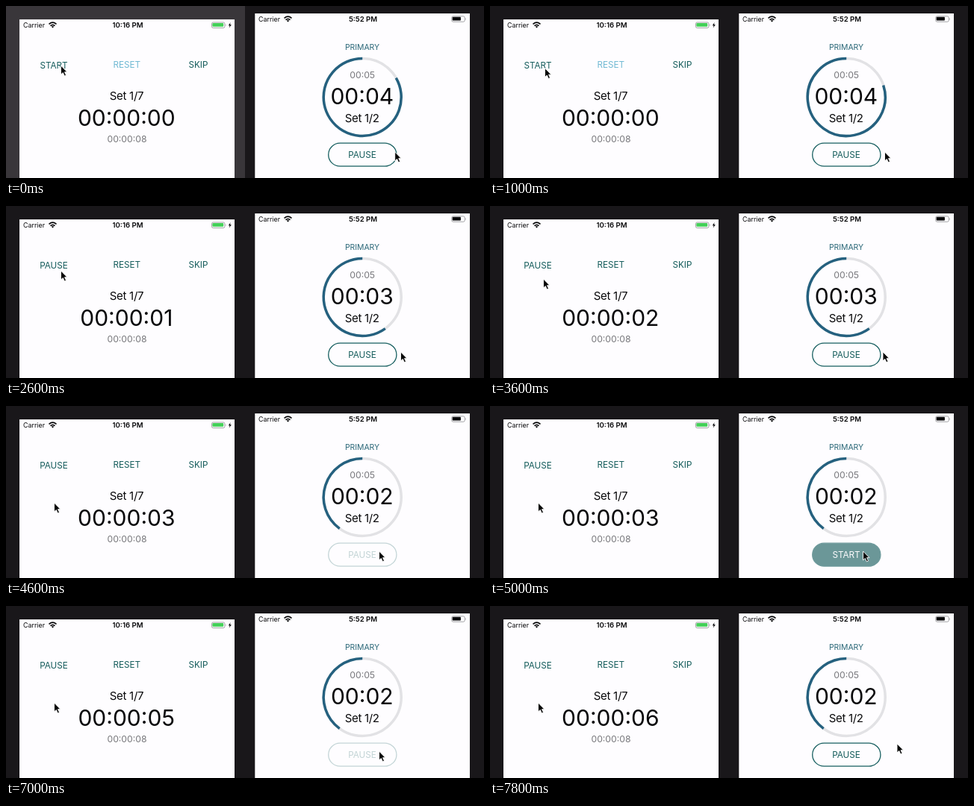
Animation, 640 px wide and 231 px high, one loop 8000 ms. Source, as an HTML page:

```html
<!DOCTYPE html>
<html lang="en">
<head>
<meta charset="utf-8">
<title>Interval timers</title>
<style>
  html, body { margin: 0; width: 100%; height: 100%; overflow: hidden; background: #19171a; }
  svg { display: block; width: 100vw; height: 100vh; }
  text { font-family: Inter, Roboto, sans-serif; text-anchor: middle; fill: #08080a; }
  .carrier { font-size: 8.9px; text-anchor: start; }
  .clock { font-size: 9.6px; font-weight: 600; }
  .action { font-size: 11.7px; fill: #145c5b; }
  .set { font-size: 15px; letter-spacing: -.3px; }
  .time { font-size: 30px; }
  .total { font-size: 12.2px; fill: #77777b; }
  .primary { font-size: 10.4px; fill: #2b6878; }
  .ring { fill: none; stroke-width: 3.5; }
</style>
</head>
<body>
<svg viewBox="0 0 640 231" preserveAspectRatio="none">
  <defs>
    <g id="wifi" fill="none" stroke="#08080a" stroke-width="1.6">
      <path d="M-5 -4.6Q0 -9 5 -4.6M-3 -2.4Q0 -5 3 -2.4"/>
      <path d="M-1.7 -1.2Q0 -2.6 1.7 -1.2L0 .6Z" fill="#08080a" stroke="none"/>
    </g>
    <g id="battery">
      <rect x=".5" y=".5" width="17.4" height="7.4" rx="1.8" fill="none" stroke="#8c8c90" stroke-width=".8"/>
      <path d="M18.9 2.8Q20.3 4.2 18.9 5.6Z" fill="#8c8c90"/>
    </g>
    <path id="arrow" d="M0 0V12L2.8 9.5L4.8 14L7 13L5 8.7H8.5Z" fill="#050505" stroke="#fff" stroke-width=".9" stroke-linejoin="round"/>
  </defs>

  <rect width="640" height="231" fill="#19171a"/>
  <rect id="backdrop" width="320" height="231" fill="#39363a"/>

  <rect x="18" y="18" width="288" height="213" fill="#fefdff"/>
  <text class="carrier" x="23" y="28.8">Carrier</text>
  <use href="#wifi" x="62.5" y="29"/>
  <text class="clock" x="163" y="29.3">10:16 PM</text>
  <use href="#battery" x="275" y="21.5"/>
  <rect x="276.4" y="22.9" width="14.8" height="4.8" rx="1" fill="#43d158"/>
  <path d="M300.6 22L297.8 26.3H299.6L298.8 29.4L301.8 24.9H300Z" fill="#08080a"/>
  <text class="action" id="toggle" x="64" y="84"></text>
  <text class="action" id="reset" x="161.7" y="83.3">RESET</text>
  <text class="action" x="257.5" y="83.3">SKIP</text>
  <text class="set" x="161.5" y="126.3">Set 1/7</text>
  <text class="time" id="elapsed" x="161.3" y="161.3"></text>
  <text class="total" x="162" y="182.6">00:00:08</text>

  <rect x="333.3" y="10" width="287.7" height="221" fill="#fefdff"/>
  <text class="carrier" x="338" y="20.8">Carrier</text>
  <use href="#wifi" x="377.5" y="21"/>
  <text class="clock" x="478" y="21.2">5:52 PM</text>
  <use href="#battery" x="596.3" y="13.3"/>
  <rect x="597.7" y="14.7" width="11.2" height="4.8" rx=".8" fill="#08080a"/>
  <text class="primary" x="477" y="58.5">PRIMARY</text>
  <circle class="ring" cx="477.2" cy="122.5" r="52" stroke="#e2e2e5"/>
  <path class="ring" id="remaining" stroke="#25617f"/>
  <text class="total" x="477.2" y="97.4">00:05</text>
  <text class="time" id="countdown" x="476.8" y="131.8"></text>
  <text class="set" x="476.7" y="156.3">Set 1/2</text>
  <g id="button">
    <rect id="pill" x="431.7" y="184.2" width="91.2" height="31" rx="15.5" stroke="#175f60" stroke-width="1.3"/>
    <text class="action" id="label" x="477" y="204"></text>
  </g>

  <use id="leftArrow" href="#arrow"/>
  <use id="rightArrow" href="#arrow"/>
</svg>
<script>
const LOOP = 8000, STEP = 200;
const $ = id => document.getElementById(id);
const clamp = v => Math.max(0, Math.min(1, v));
const ease = v => v * v * (3 - 2 * v);

// Each key is [time, ...values]; values ease from one key to the next.
function along(keys, t) {
  const next = keys.findIndex(key => key[0] > t);
  if (next < 0) return keys[keys.length - 1].slice(1);
  if (next === 0) return keys[0].slice(1);
  const from = keys[next - 1], to = keys[next];
  const p = ease((t - from[0]) / (to[0] - from[0]));
  return from.slice(1).map((v, i) => v + (to[i + 1] - v) * p);
}

const leftPath = [[0, 73.5, 80], [600, 73.5, 80], [1400, 73.5, 87],
  [2600, 73.5, 87], [3600, 71.5, 98], [4400, 64.5, 130]];
const rightPath = [[0, 520.7, 196], [200, 520.7, 196], [1000, 528.5, 196],
  [2600, 528.5, 196], [3400, 526, 196], [3700, 526, 196],
  [4400, 499.5, 195], [7200, 499.5, 195], [7800, 545, 185]];
const ringGap = [[0, 60], [400, 72], [1600, 72], [2200, 144], [3700, 144], [4500, 216]];
const buttonOpacity = [[0, 1], [4400, 1], [4600, .25], [4800, .25], [5200, 1],
  [6600, 1], [6800, .25], [7000, .25], [7400, 1]];

function place(id, keys, t) {
  const [x, y] = along(keys, t);
  $(id).setAttribute("transform", `translate(${x} ${y})`);
}

function drawRing(gap) {
  const a = gap * Math.PI / 180;
  const x = 477.2 + 52 * Math.sin(a), y = 122.5 - 52 * Math.cos(a);
  $("remaining").setAttribute("d", `M${x} ${y}A52 52 0 ${gap < 180 ? 1 : 0} 1 477.2 70.5`);
}

function render(t) {
  const started = t >= 1200;
  const seconds = Math.max(0, Math.floor((t - 1300) / 1000));
  $("backdrop").setAttribute("opacity", 1 - clamp(t / 400));
  $("toggle").textContent = started ? "PAUSE" : "START";
  $("reset").style.fill = started ? "" : "#70b9d3";
  $("elapsed").textContent = "00:00:0" + seconds;

  $("countdown").textContent = "00:0" + (t < 1600 ? 4 : t < 3800 ? 3 : 2);
  drawRing(along(ringGap, t)[0]);

  const paused = t >= 4800 && t < 6800;
  $("label").textContent = paused ? "START" : "PAUSE";
  $("label").style.fill = paused ? "#fefdff" : "";
  $("pill").setAttribute("fill", paused ? "#145a5b" : "#fefdff");
  $("button").setAttribute("opacity", along(buttonOpacity, t)[0]);

  place("leftArrow", leftPath, t);
  place("rightArrow", rightPath, t);
}

const start = performance.now();
function tick() {
  const t = (performance.now() - start) % LOOP;
  render(Math.floor(t / STEP) * STEP);
  requestAnimationFrame(tick);
}
tick();
</script>
</body>
</html>
```
